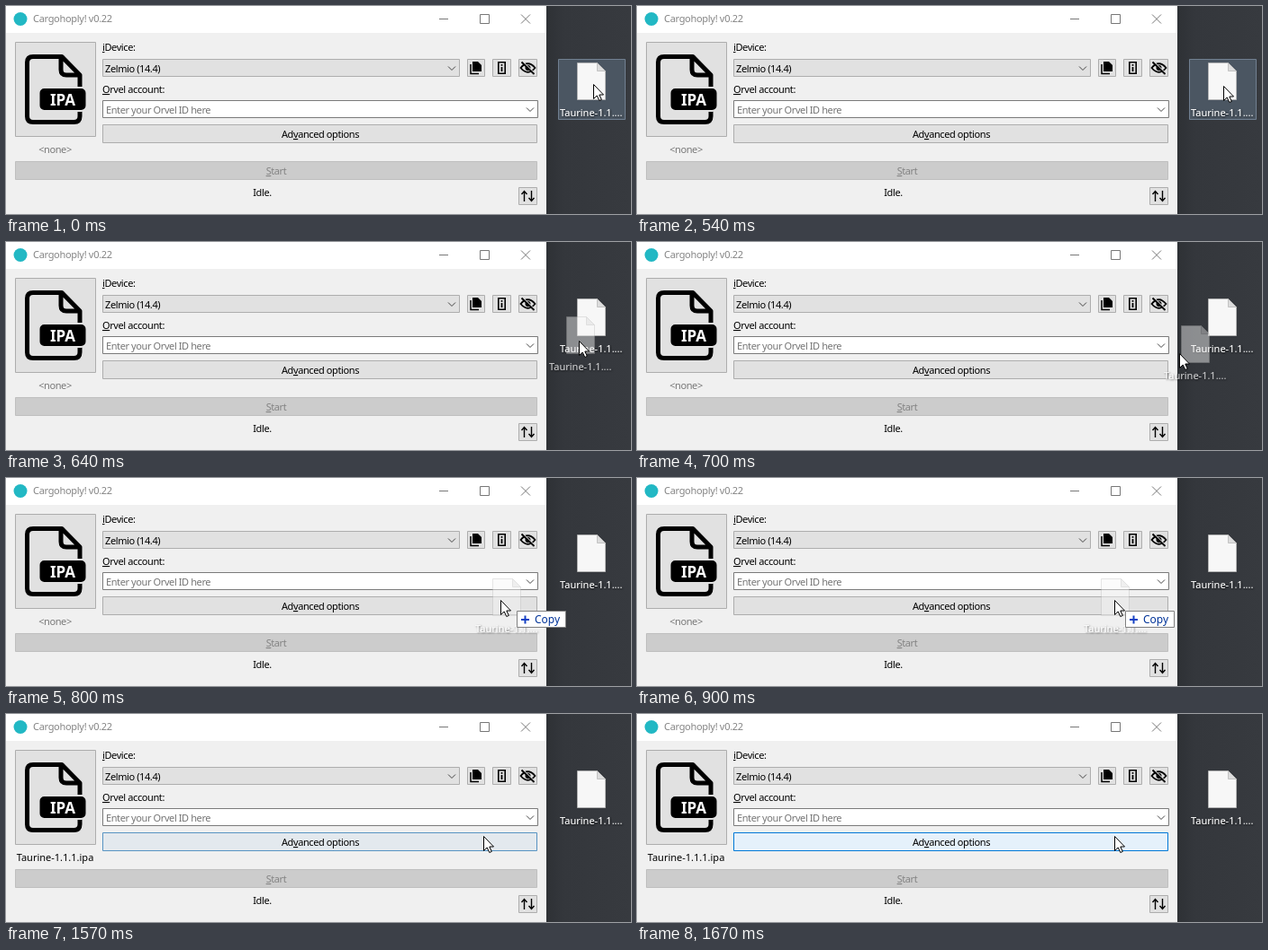
An HTML page for the animation above (3000 ms loop, 694x232 px).

```html
<!DOCTYPE html>
<html lang="en">
<head>
<meta charset="utf-8">
<title>Drag and drop a package</title>
<style>
html, body { margin: 0; width: 100%; height: 100%; overflow: hidden; background: #f0f0f0; }
svg { display: block; width: 694px; height: 232px; }
text { font: 11px "Noto Sans", "Open Sans", sans-serif; letter-spacing: -.4px; }
.mid { text-anchor: middle; }
.wide { letter-spacing: 0; }
.key { text-decoration: underline; }
.button { fill: #e1e1e1; stroke: #adadad; }
.line { fill: none; stroke: #000; }
</style>
</head>
<body>
<svg viewBox="0 0 694 232">
  <defs>
    <linearGradient id="desk">
      <stop offset="0" stop-color="#2e3135"/>
      <stop offset=".2" stop-color="#34373c"/>
      <stop offset="1" stop-color="#373a3f"/>
    </linearGradient>
    <filter id="shadow" x="-10%" y="-30%" width="120%" height="180%">
      <feDropShadow dx="1" dy="1" stdDeviation=".8" flood-opacity=".8"/>
    </filter>
    <g id="page" stroke="#b9b9b9" stroke-width=".8">
      <path d="M.5 .5H22.500L31.500 9.500V41.500H.5Z" fill="#f7f7f7"/>
      <path d="M22.500 .5V9.500H31.500Z" fill="#dcdcdc"/>
    </g>
    <text id="caption" class="wide" x="-19" y="60" fill="#fff" filter="url(#shadow)">Taurine-1.1....</text>
    <path id="chevron" class="line" d="M0 0L4 4L8 0" style="stroke:#444"/>
  </defs>

  <!-- window -->
  <path d="M0 0H600V232H0Z" fill="#f0f0f0"/>
  <path d="M0 0H600V30H0Z" fill="#fff"/>
  <circle cx="16" cy="14.500" r="7.500" fill="#22b8c4"/>
  <text x="30" y="18" fill="#858585" style="letter-spacing:-.3px">Cargohoply! v0.22</text>
  <path class="line" style="stroke:#777" d="M481 14.500H491M526.500 9.500H536.500V19.500H526.500ZM572 9.500L582 19.500M582 9.500L572 19.500"/>

  <!-- package picker -->
  <path class="button" d="M10.500 40.500H99.500V145.500H10.500Z"/>
  <path class="line" stroke-width="5" stroke-linejoin="round" d="M82 90V77L62 56.500H30Q23.500 56.500 23.500 63V123Q23.500 129.500 30 129.500H75.500Q82 129.500 82 123V116M61 58V71Q61 77 67 77H81"/>
  <rect x="36.500" y="91" width="53" height="26" rx="6" stroke="#e1e1e1" stroke-width="2"/>
  <text class="mid wide" x="63" y="110.500" fill="#fff" style="font-size:17px;font-weight:700">IPA</text>
  <text id="pick" class="mid" x="54.500" y="164"></text>

  <!-- device -->
  <text x="107" y="50"><tspan class="key">i</tspan>Device:</text>
  <path class="button" d="M107.500 59.500H503.500V78.500H107.500ZM512.500 59.500H531.500V78.500H512.500ZM540.500 59.500H560.500V78.500H540.500ZM569.500 59.500H589.500V78.500H569.500ZM569.500 202.500H589.500V221.500H569.500Z"/>
  <text x="110" y="74">Zelmio (14.4)</text>
  <use href="#chevron" x="491" y="67.500"/>
  <path d="M518 62H524L528 66V73H518Z"/>
  <path class="line" stroke-width="1.500" d="M516 65V75.500H525"/>
  <path class="line" stroke-width="1.600" d="M546.800 62.800H554.200V75.200H546.800Z"/>
  <path class="line" stroke-width="1.800" d="M550.500 65V66.800M550.500 68V73"/>
  <path class="line" stroke-width="1.800" d="M571.500 69Q579.500 59.500 587.500 69Q579.500 78.500 571.500 69Z"/>
  <circle cx="579.500" cy="69" r="3"/>
  <path class="line" stroke="#e1e1e1" stroke-width="1.500" d="M573.500 62L587 75" style="stroke:#e1e1e1"/>
  <path class="line" stroke-width="1.800" d="M572.500 62.500L586.500 76"/>

  <!-- account -->
  <text x="107" y="97"><tspan class="key">O</tspan>rvel account:</text>
  <path d="M107.500 105.500H590.500V124.500H107.500Z" fill="#fff" stroke="#7a7a7a"/>
  <text x="111" y="120" fill="#757575">Enter your Orvel ID here</text>
  <use href="#chevron" x="578" y="113.500"/>
  <path id="advanced" d="M107.500 132.500H589.500V152.500H107.500Z"/>
  <text class="mid" x="349" y="147">Ad<tspan class="key">v</tspan>anced options</text>

  <!-- start and status -->
  <path d="M10.500 173.500H589.500V193.500H10.500Z" fill="#ccc" stroke="#bfbfbf"/>
  <text class="mid" x="300" y="188" fill="#838383"><tspan class="key">S</tspan>tart</text>
  <text class="mid" x="284.500" y="212">Idle.</text>
  <path class="line" stroke-width="1.400" d="M575.500 218V207M572.500 210L575.500 206.500L578.500 210M583.500 206V217M580.500 214L583.500 217.500L586.500 214"/>

  <!-- desktop -->
  <path d="M600 0H694V232H600Z" fill="url(#desk)"/>
  <path id="selection" d="M613.500 59.500H687.500V126.500H613.500Z" fill="#4b5662" stroke="#718091"/>
  <use href="#page" x="634" y="63"/>
  <use href="#caption" x="634" y="63"/>

  <!-- dragged copy -->
  <g id="ghost">
    <use href="#page" opacity=".45"/>
    <use href="#caption" opacity=".75"/>
    <g id="tag">
      <path d="M27.500 36.500H81.500V54.500H27.500Z" fill="#fff" stroke="#808080"/>
      <path d="M32 46H41M36.500 41.500V50.500" stroke="#1541c4" stroke-width="2"/>
      <text class="wide" x="47" y="50" fill="#039" style="font-size:12px">Copy</text>
    </g>
  </g>
  <path id="cursor" d="M.5 .5V16.500L4.200 13L6.800 18.500L9.300 17.400L6.800 12H11.500Z" fill="#fff" stroke="#000"/>
</svg>
<script>
const LOOP = 3000, DRAG_START = 540, TICK = 100 / 3;
const DROP = 27, HOVER = 28, HOVER_TICKS = 6;   // in ticks after the drag starts
const pathX = [651, 648, 640, 636, 622, 602, 580, 558, 549, 540, 533, 530];
const pathY = [89, 98, 107, 110, 117, 124, 130, 136, 136, 136, 136, 136];
const el = id => document.getElementById(id);
const [pick, advanced, selection, ghost, tag, cursor] =
  ["pick", "advanced", "selection", "ghost", "tag", "cursor"].map(el);

const show = (node, on) => node.setAttribute("visibility", on ? "visible" : "hidden");
const place = (node, x, y) => node.setAttribute("transform", `translate(${x} ${y})`);
const mix = (a, b, f) => `rgb(${a.map((v, i) => Math.round(v + (b[i] - v) * f))})`;

function pointer(tick) {
  if (tick < 0) return [652, 87];
  const i = Math.min(tick, pathX.length - 1);
  return [pathX[i], pathY[i]];
}

function draw(time) {
  const tick = Math.floor((time % LOOP - DRAG_START + 7) / TICK);
  const dropped = tick >= DROP;
  const dragging = tick >= 2 && !dropped;
  const [x, y] = pointer(tick);
  const [ghostX, ghostY] = pointer(tick - 1);   // the copy trails by one tick

  place(cursor, x, y);
  place(ghost, ghostX - 18, ghostY - 24);
  show(ghost, dragging);
  show(tag, dragging && x < 600);
  show(selection, tick < 2);

  pick.textContent = dropped ? "Taurine-1.1.1.ipa" : "<none>";
  pick.setAttribute("fill", dropped ? "#000" : "#787878");
  pick.style.letterSpacing = dropped ? "0" : "";

  const glow = Math.max(0, Math.min(1, (tick - HOVER) / HOVER_TICKS));
  advanced.setAttribute("fill", mix([225, 225, 225], [229, 241, 251], glow));
  advanced.setAttribute("stroke", mix([173, 173, 173], [0, 120, 215], glow));
}

function loop() {
  draw(performance.now());
  requestAnimationFrame(loop);
}
loop();
</script>
</body>
</html>
```
